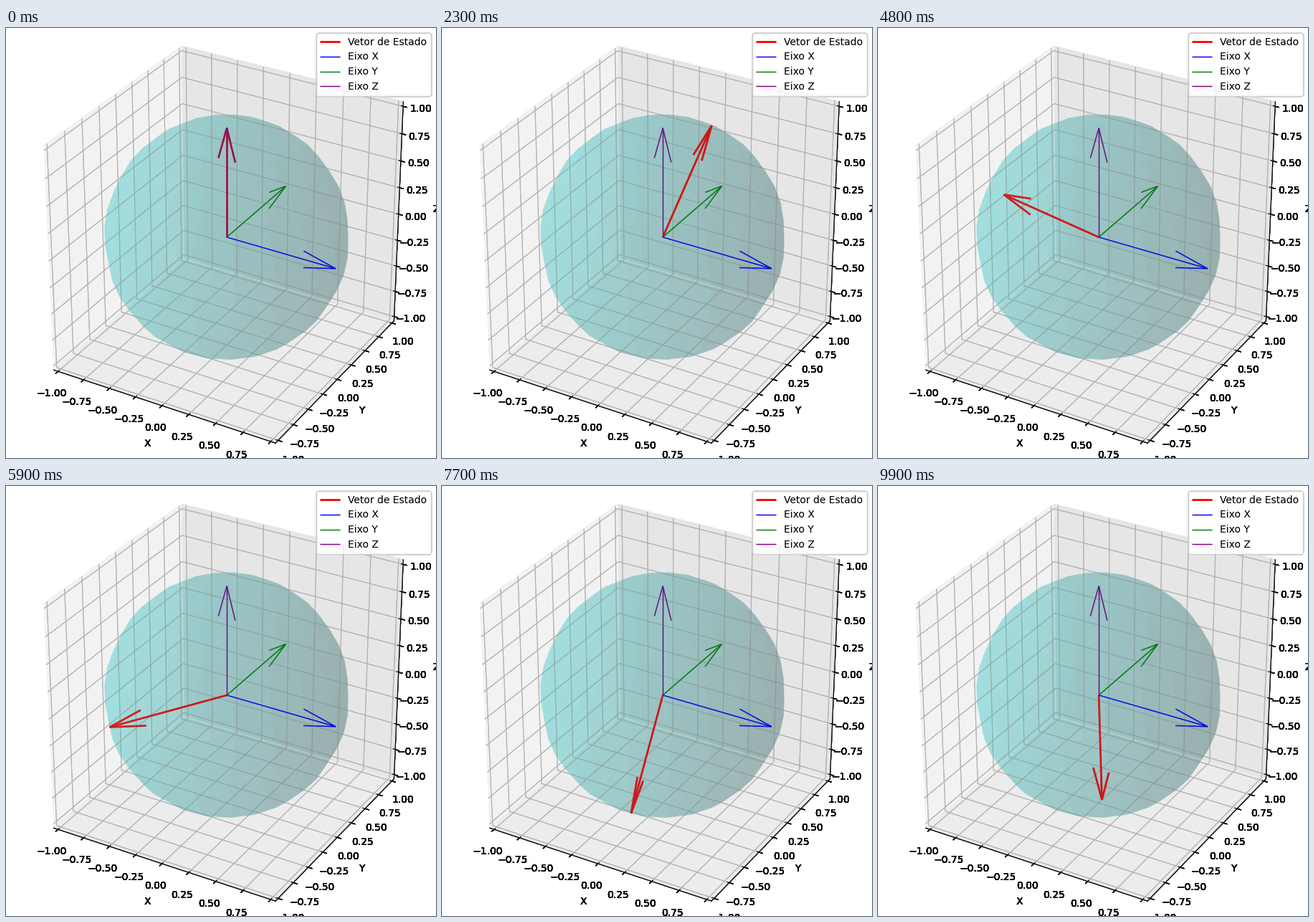
A matplotlib script for the animation above (10 s loop, 600 px wide and 600 px high).

```python
import numpy as np
import matplotlib.pyplot as plt
from matplotlib.animation import FuncAnimation
from mpl_toolkits.mplot3d.art3d import Line3DCollection

FRAMES = 100
HEAD_RATIO = 0.3
HEAD_ANGLE = np.radians(15)
LIMITS = (-25 / 24, 25 / 24)


def arrow(v):
    """Shaft and two head strokes of an arrow from the origin to v."""
    v = np.asarray(v, float)
    flat = np.hypot(v[0], v[1])
    axis = np.array([v[1], -v[0], 0]) / flat if flat > 0 else np.array([0, 1, 0])
    side = np.cross(axis, v) * np.sin(HEAD_ANGLE)
    back = v * np.cos(HEAD_ANGLE)
    heads = [[v, v - HEAD_RATIO * (back + s * side)] for s in (1, -1)]
    return [[np.zeros(3), v], *heads]


def add_arrow(v, color, label, width=1.0):
    lines = Line3DCollection(arrow(v), colors=color, linewidths=width, label=label)
    ax.add_collection3d(lines)
    return lines


def add_sphere(n=20):
    u, v = np.meshgrid(np.linspace(0, 2 * np.pi, n), np.linspace(0, np.pi, n), indexing="ij")
    ax.plot_surface(np.cos(u) * np.sin(v), np.sin(u) * np.sin(v), np.cos(v),
                    color="c", alpha=0.1)


def state(frame):
    t = frame / FRAMES
    theta, phi = np.pi * t, 2 * np.pi * t
    return (np.sin(theta) * np.cos(phi), np.sin(theta) * np.sin(phi), np.cos(theta))


def bake_backdrop(passes=10):
    """Layer the still scene over itself, end on the bare axes, keep it as an image."""
    ax.patch.set_visible(False)
    vector.set_visible(False)
    fig.canvas.draw()
    renderer = fig.canvas.get_renderer()
    for _ in range(passes - 2):
        ax.draw(renderer)

    overlays = [*ax.collections, legend]
    plt.setp(overlays, visible=False)
    ax.draw(renderer)
    plt.setp(overlays, visible=True)

    fig.figimage(np.array(fig.canvas.buffer_rgba()), 0, 0, origin="upper", zorder=-1)
    ax.set_axis_off()


fig = plt.figure(figsize=(6, 6), dpi=100)
ax = fig.add_axes([0, 0, 1, 1], projection="3d")
ax.set_box_aspect((1, 1, 1))
ax.view_init(elev=30, azim=-60)

add_sphere()
vector = add_arrow(state(0), "red", "Vetor de Estado", 2)
add_arrow((1, 0, 0), "blue", "Eixo X")
add_arrow((0, 1, 0), "green", "Eixo Y")
add_arrow((0, 0, 1), "purple", "Eixo Z")
ax.set(xlim=LIMITS, ylim=LIMITS, zlim=LIMITS, xlabel="X", ylabel="Y", zlabel="Z")
legend = ax.legend(loc="upper right")
bake_backdrop()


def update(frame):
    vector.set_segments(arrow(state(frame)))
    return [vector]


anim = FuncAnimation(fig, update, frames=FRAMES, interval=100, blit=False)
plt.show()
```
